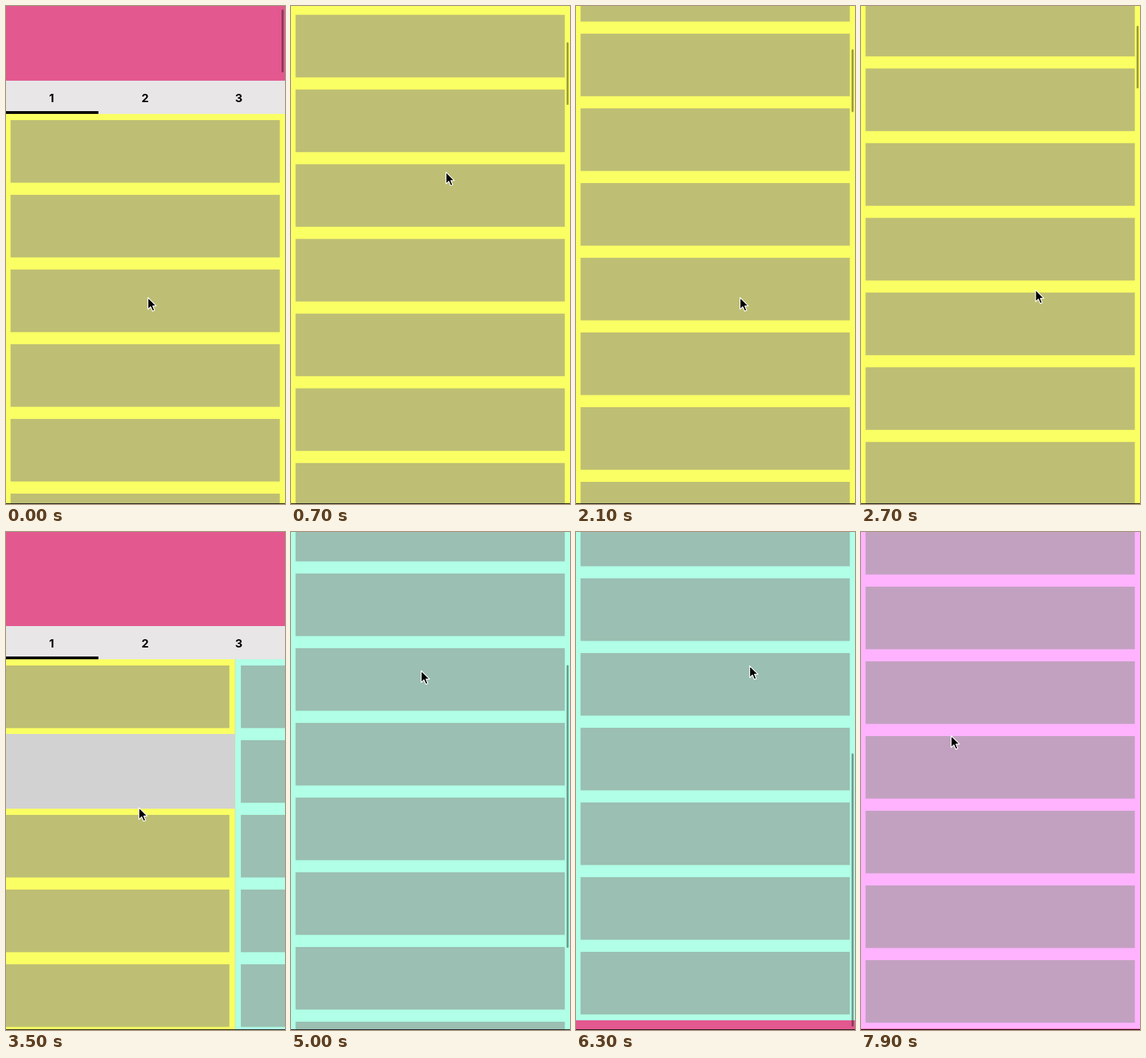
Animation of 404x720 px, one loop 8 s. Source, as an HTML page:

```html
<!DOCTYPE html>
<html lang="en">
<head>
<meta charset="utf-8">
<title>Swipeable tabs</title>
<style>
  html, body { margin: 0; width: 100%; height: 100%; overflow: hidden; background: #e2588f; }
  svg { display: block; width: 100vw; height: 100vh; }
  text { font: 700 16.5px Inter, Roboto, sans-serif; text-anchor: middle; }
</style>
</head>
<body>
<svg id="stage" viewBox="0 0 404 720"></svg>
<script>
const LOOP = 8000, STEP = 100;
const VIEW = 720, HEADER = 108, TOP = 156, CELL = 108;
const LEFT = -1.7, WIDTH = 406.5, TAB = WIDTH / 3;
const PAGES = [
  { rows: 50, back: '#faff64', fill: '#bebf74' },
  { rows: 10, back: '#b0ffe6', fill: '#9bbfb2' },
  { rows: 10, back: '#ffb3ff', fill: '#c2a1c0' }
];

// Each track is a list of [time, value].
const scrollTrack = [
  [0, 0], [150, 8], [350, 110], [600, 290], [900, 520], [1150, 660], [1400, 736],
  [1600, 752], [1750, 715], [1900, 600], [2100, 449], [2400, 300], [2750, 160],
  [2950, 40], [3150, -28], [4550, -28], [4700, 40], [5000, 321], [5250, 455],
  [5500, 515], [5750, 524], [6000, 517], [6300, 530], [6600, 521], [6900, 518], [8000, 518]
];
const swipeTrack = [
  [0, 0], [3300, 0], [3500, 73], [3650, 230], [3800, 360], [4000, WIDTH],
  [7150, WIDTH], [7300, WIDTH + 60], [7450, WIDTH + 220], [7600, WIDTH + 360], [7800, WIDTH * 2]
];
const tabTrack = [[0, 0], [3900, 0], [4200, TAB], [7700, TAB], [7950, TAB * 2]];
const barTrack = [[0, 1], [2950, 1], [3250, 0], [4500, 0], [4600, 1], [6700, 1], [7000, 0]];
const cursorX = [
  [0, 205], [600, 222], [1400, 234], [2100, 237], [2800, 255], [3250, 265], [3500, 192],
  [3700, 110], [4100, 120], [4600, 180], [5000, 188], [5600, 222], [6300, 251],
  [7150, 275], [7300, 225], [7550, 145], [7900, 130]
];
const cursorY = [
  [0, 421], [150, 415], [600, 225], [900, 300], [1400, 395], [1650, 270], [2100, 421],
  [2500, 400], [2900, 420], [3500, 398], [4100, 440], [4550, 480], [5000, 200],
  [5500, 225], [6300, 193], [6900, 270], [7900, 294]
];

// Monotone cubic through the track's points
function at(track, t) {
  const last = track.length - 1;
  if (t >= track[last][0]) return track[last][1];
  let i = 0;
  while (track[i + 1][0] <= t) i++;
  const slope = k => (track[k + 1][1] - track[k][1]) / (track[k + 1][0] - track[k][0]);
  const tangent = k => {
    if (k === 0 || k === last) return 0;
    const a = slope(k - 1), b = slope(k);
    return a * b <= 0 ? 0 : 2 * a * b / (a + b);
  };
  const [t0, v0] = track[i], [t1, v1] = track[i + 1];
  const h = t1 - t0, u = (t - t0) / h, w = 1 - u;
  return v0 * (1 + 2 * u) * w * w + tangent(i) * h * u * w * w
       + v1 * u * u * (3 - 2 * u) - tangent(i + 1) * h * u * u * w;
}

function add(parent, tag, attrs = {}) {
  const node = document.createElementNS('http://www.w3.org/2000/svg', tag);
  set(node, attrs);
  return parent.appendChild(node);
}
function set(node, attrs) {
  for (const key in attrs) node.setAttribute(key, attrs[key]);
}
const rect = (parent, x, y, width, height, fill) =>
  add(parent, 'rect', { x, y, width, height, fill });
const move = (node, x, y) => set(node, { transform: `translate(${x} ${y})` });

const stage = document.getElementById('stage');
rect(stage, 0, 0, 404, VIEW, '#e2588f');

const content = add(stage, 'g');
const pager = add(content, 'g');
PAGES.forEach(({ rows, back, fill }, p) => {
  const x = LEFT + p * WIDTH;
  rect(pager, x, TOP, WIDTH, rows * CELL, back);
  for (let i = 0; i < rows; i++) {
    rect(pager, x + 8.3, TOP + 9 + i * CELL, WIDTH - 16.6, 90.5, fill);
  }
});
const pressed = rect(pager, LEFT, TOP + CELL, WIDTH, CELL, '#d2d2d2');

rect(content, 0, HEADER, 404, TOP - HEADER, '#e8e6e7');
for (let i = 0; i < 3; i++) {
  add(content, 'text', { x: LEFT + TAB * (i + 0.5), y: 138.5 }).textContent = i + 1;
}
const indicator = rect(content, LEFT, 152, TAB, 4, '#000');

const bar = add(stage, 'rect', { x: 399, width: 3, rx: 1.5, fill: '#000' });
rect(stage, 0, 719, 404, 1, '#111');
const cursor = add(stage, 'path', {
  d: 'M0 0V17L4 13.3L6.7 19.6L9.6 18.4L7 12.2H12Z',
  fill: '#000', stroke: '#fff', 'stroke-width': 1.2, 'stroke-linejoin': 'round'
});

function drawBar(scroll, rows, opacity) {
  const total = TOP + rows * CELL, max = total - VIEW;
  const full = 702 * VIEW / total;
  const over = Math.max(0, -scroll, scroll - max);
  const progress = Math.min(1, Math.max(0, scroll / max));
  const height = full - over;
  set(bar, { y: 5 + progress * (710 - height), height, opacity: 0.37 * opacity });
}

function render(time) {
  const t = Math.floor(time % LOOP / STEP) * STEP;
  const scroll = at(scrollTrack, t), swipe = at(swipeTrack, t);
  move(content, 0, -scroll);
  move(pager, -swipe, 0);
  move(indicator, at(tabTrack, t), 0);
  move(cursor, at(cursorX, t) + 0.5, at(cursorY, t) + 0.5);
  set(pressed, { visibility: t >= 3300 && t < 3700 ? 'visible' : 'hidden' });
  drawBar(scroll, PAGES[Math.round(swipe / WIDTH)].rows, at(barTrack, t));
}

const start = performance.now();
function tick() {
  render(performance.now() - start);
  requestAnimationFrame(tick);
}
tick();
</script>
</body>
</html>
```
